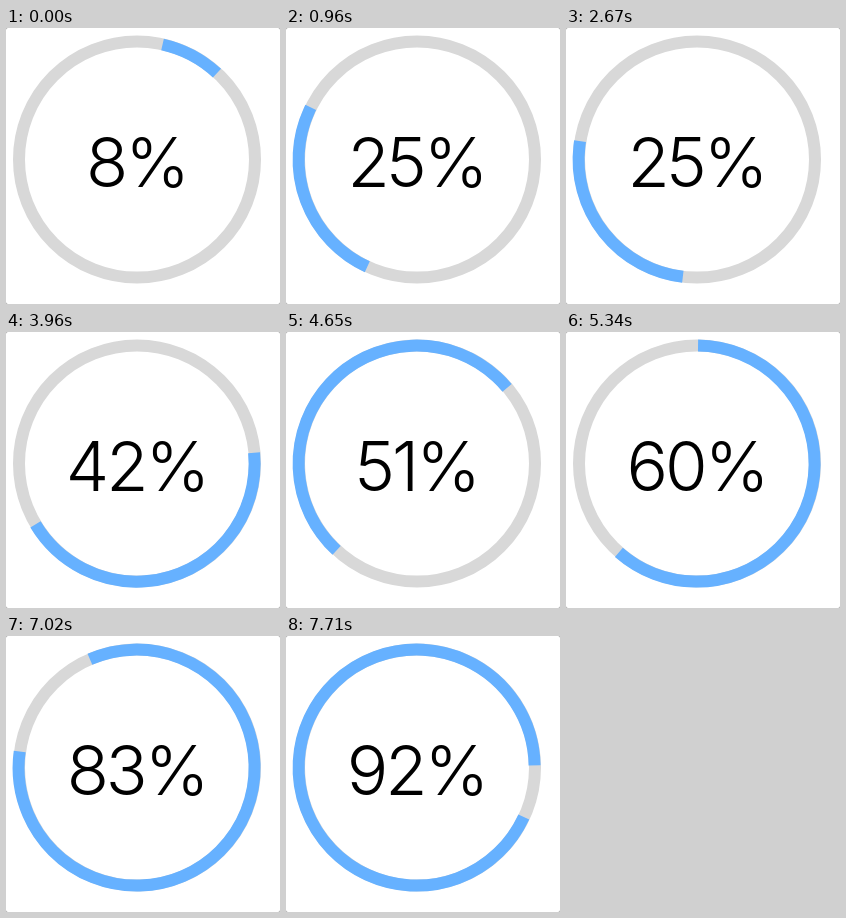
An HTML page for the animation above (7740 ms loop, 274 by 276 pixels).

```html
<!DOCTYPE html>
<html lang="en">
<head>
<meta charset="utf-8">
<title>Circular progress</title>
<style>
  html, body { margin: 0; width: 100%; height: 100%; overflow: hidden; background: #999; }
  svg { display: block; }
  circle { fill: none; stroke-width: 12; }
  text { font: 360 69px Inter, "Liberation Sans", sans-serif; letter-spacing: -3px; text-anchor: middle; }
</style>
</head>
<body>
<svg width="274" height="276" viewBox="0 0 274 276">
  <rect width="274" height="276" rx="2" fill="#fff"/>
  <circle cx="131" cy="131.5" r="118" stroke="#d8d8d8"/>
  <circle id="arc" r="118" stroke="#66b1ff" pathLength="100"/>
  <text id="label" x="130.5" y="159"></text>
</svg>
<script>
const LOOP = 7740, STEP = 30, RESTART = 53;
const LABEL_LAG = 0.3; // the number trails the arc slightly
const arc = document.getElementById('arc');
const label = document.getElementById('label');

// An eased first run, then a steady climb after the restart.
function percentAt(step) {
  return step < RESTART
    ? 8.4 + 25 * (1 - Math.exp(-step / 28))
    : 0.4 * (step - 26) + 0.45;
}

function draw() {
  const step = Math.floor(performance.now() % LOOP / STEP);
  const percent = percentAt(step);
  const angle = 12.7 + 6 * step - 90;
  arc.setAttribute('stroke-dasharray', `${percent} ${100 - percent}`);
  arc.setAttribute('transform', `translate(130.6 131.6) rotate(${angle})`);
  label.textContent = Math.floor(percent - LABEL_LAG) + '%';
  requestAnimationFrame(draw);
}
draw();
</script>
</body>
</html>
```
